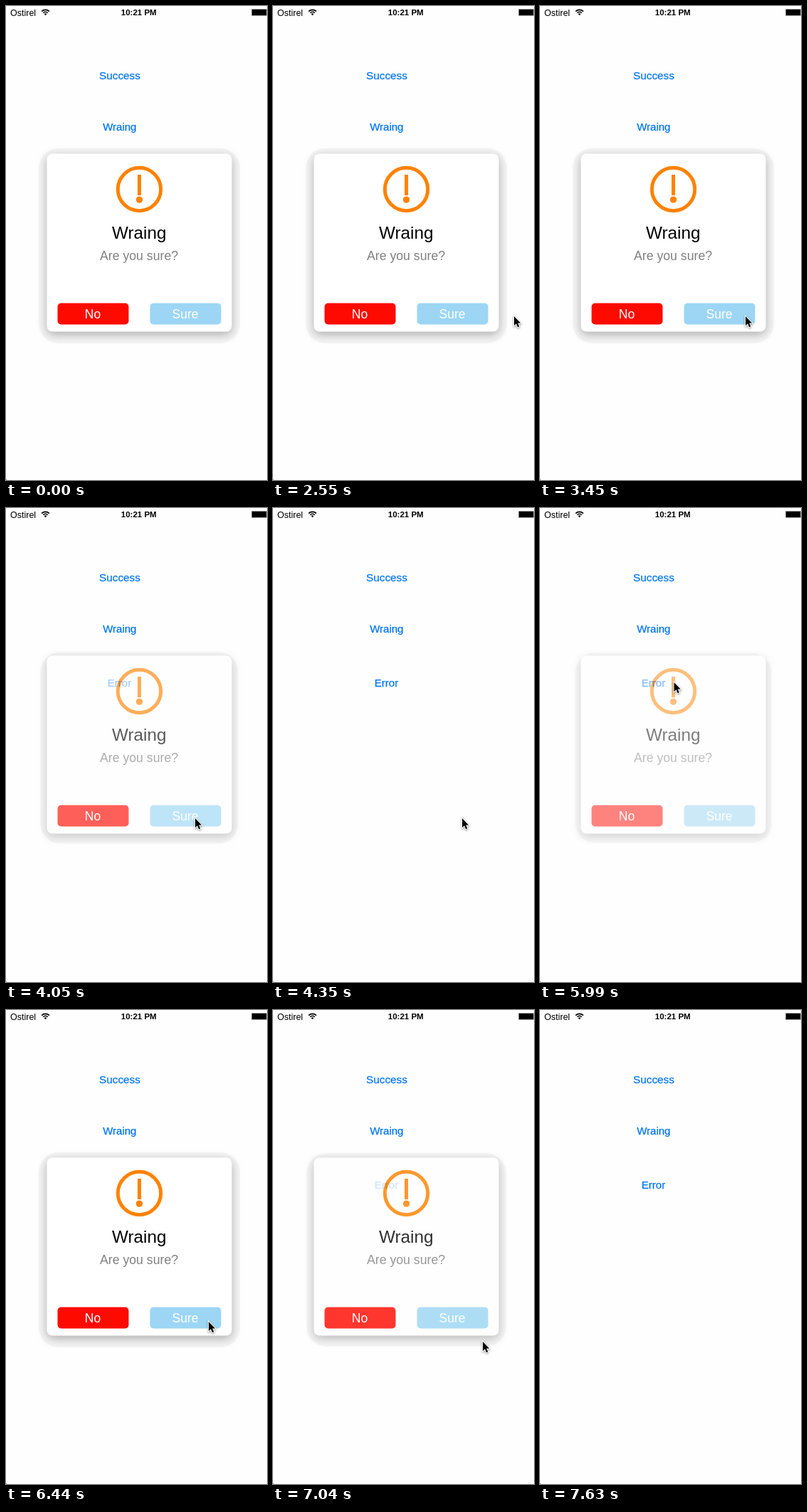
Animation of 367 by 666 pixels, one loop 8670 ms. Source, as an HTML page with a canvas:

```html
<!DOCTYPE html>
<html lang="en">
<head>
<meta charset="utf-8">
<title>Alert demo</title>
<style>
  html, body { margin: 0; width: 100%; height: 100%; overflow: hidden; background: #fefefe; }
  canvas { display: block; }
</style>
</head>
<body>
<canvas id="stage" width="367" height="666"></canvas>
<script>
const W = 367, H = 666, LOOP = 8670, STEP = 150;
const FONT = '"Liberation Sans", Arial, sans-serif';
const BLUE = '#0076f2', ORANGE = '#ff8200', PAPER = '#fefefe';
const ctx = document.getElementById('stage').getContext('2d');

// Pointer stops: [step, x, y]; the pointer is hidden outside this range.
const stops = [
  [17, 338, 434], [19, 322, 434], [21, 302, 434], [23, 288, 434],
  [25, 265, 434], [30, 265, 434], [31, 264, 427], [33, 228, 320],
  [35, 170, 164], [36, 159, 145], [37, 155, 162], [38, 155, 168],
  [39, 155, 168], [41, 220, 318], [42, 267, 412], [43, 284, 436],
  [46, 284, 436], [48, 304, 492], [50, 353, 635]
];

const ease = x => {
  x = Math.min(1, Math.max(0, x));
  return x * x * (3 - 2 * x);
};

function box(c, x, y, w, h, r, color) {
  c.fillStyle = color;
  c.beginPath();
  c.roundRect(x, y, w, h, r);
  c.fill();
}

function label(c, str, x, y, size, color, align = 'center', weight = 'normal') {
  c.font = `${weight} ${size}px ${FONT}`;
  c.textAlign = align;
  c.fillStyle = color;
  c.fillText(str, x, y);
}

// Menu entries carry a hairline outline for a slightly heavier face.
function menuItem(str, x, y, size, alpha = 1) {
  ctx.globalAlpha = alpha;
  label(ctx, str, x, y, size, BLUE);
  ctx.strokeStyle = BLUE;
  ctx.lineWidth = 0.25;
  ctx.strokeText(str, x, y);
  ctx.globalAlpha = 1;
}

const errorItem = () => menuItem('Error', 159.5, 250.5, 15);

function makeCard() {
  const cv = document.createElement('canvas');
  cv.width = W;
  cv.height = H;
  const c = cv.getContext('2d');

  c.save();
  c.shadowColor = 'rgba(0,0,0,0.3)';
  c.shadowBlur = 14;
  c.shadowOffsetY = 4;
  box(c, 57.5, 207.5, 260, 250, 8, '#fff');
  c.restore();

  c.strokeStyle = ORANGE;
  c.lineWidth = 5;
  c.beginPath();
  c.arc(187.5, 257.5, 30.2, 0, Math.PI * 2);
  c.stroke();
  box(c, 185, 237, 5, 29, 0, ORANGE);
  box(c, 182.8, 267.4, 9.4, 9.4, 4.7, ORANGE);

  label(c, 'Wraing', 187.2, 326.5, 24.3, '#000');
  label(c, 'Are you sure?', 187, 356.5, 17.7, '#808080');
  box(c, 72.5, 417.5, 100, 30, 5, '#ff0a00');
  box(c, 202.5, 417.5, 100, 30, 5, '#9cd6f4');
  label(c, 'No', 122, 438.5, 17.5, '#fff');
  label(c, 'Sure', 252, 438.5, 17.5, '#fff');
  return cv;
}
const card = makeCard();

function drawStatus() {
  label(ctx, 'Ostirel', 6, 13.5, 12.5, '#000', 'left');
  label(ctx, '10:21 PM', 186.7, 13, 11.5, '#000', 'center', 'bold');

  ctx.strokeStyle = '#000';
  ctx.lineWidth = 1.6;
  for (const r of [4.6, 7.6]) {
    ctx.beginPath();
    ctx.arc(55.5, 13, r, -Math.PI * 0.75, -Math.PI * 0.25);
    ctx.stroke();
  }
  ctx.fillStyle = '#000';
  ctx.beginPath();
  ctx.moveTo(55.5, 13.2);
  ctx.arc(55.5, 13, 2.6, -Math.PI * 0.75, -Math.PI * 0.25);
  ctx.fill();

  box(ctx, 345, 4, 22, 10, 1, '#999');
  box(ctx, 346, 5, 20, 8, 0, '#000');
}

function drawCard(a) {
  if (a <= 0) return;
  const d = (1 - a) * 7;
  ctx.globalAlpha = Math.min(1, a * 1.5);
  box(ctx, 46 + d, 200 + d, 283 - 2 * d, 274 - 2 * d, 28, '#f5f5f5');
  ctx.globalAlpha = 1;
  // The menu below shows through the card while it fades.
  box(ctx, 57.5, 207.5, 260, 250, 8, PAPER);
  errorItem();
  ctx.globalAlpha = a;
  ctx.drawImage(card, 0, 0);
  ctx.globalAlpha = 1;
}

function pointerAt(step) {
  const next = stops.findIndex(k => k[0] >= step);
  if (next < 0 || step < stops[0][0]) return null;
  const b = stops[next], a = stops[Math.max(0, next - 1)];
  const p = b === a ? 0 : (step - a[0]) / (b[0] - a[0]);
  return [a[1] + (b[1] - a[1]) * p, a[2] + (b[2] - a[2]) * p];
}

function drawPointer(pos) {
  if (!pos) return;
  ctx.save();
  // Stops mark the tip of the white rim; the black arrow sits inside it.
  ctx.translate(pos[0] + 1, pos[1] + 2);
  ctx.beginPath();
  ctx.moveTo(0, 0);
  ctx.lineTo(0, 13);
  ctx.lineTo(3, 10.2);
  ctx.lineTo(5.2, 15.2);
  ctx.lineTo(7.3, 14.3);
  ctx.lineTo(5.2, 9.4);
  ctx.lineTo(9.2, 9.4);
  ctx.closePath();
  ctx.shadowColor = 'rgba(0,0,0,0.45)';
  ctx.shadowBlur = 3;
  ctx.shadowOffsetY = 1;
  ctx.strokeStyle = '#fff';
  ctx.lineWidth = 2;
  ctx.stroke();
  ctx.shadowColor = 'transparent';
  ctx.fillStyle = '#000';
  ctx.fill();
  ctx.restore();
}

function cardAlpha(t) {
  if (t < 5000) return 1 - ease((t - 3890) / 400);
  if (t < 6600) return ease((t - 5800) / 400);
  return 1 - ease((t - 6940) / 400);
}

function render(now) {
  const ms = now % LOOP;
  const slip = ms >= 7600 ? 20 : ms >= 5600 ? 10 : 0;
  const step = Math.floor((ms + slip) / STEP);

  ctx.fillStyle = PAPER;
  ctx.fillRect(0, 0, W, H);
  drawStatus();
  menuItem('Success', 160, 102.5, 15.3);
  menuItem('Wraing', 159.8, 174.5, 15, step === 38 ? 0.25 : 1);
  errorItem();
  drawCard(cardAlpha(step * STEP));
  drawPointer(pointerAt(step));
  box(ctx, 0, 665, 1, 1, 0, '#999');
}

let start;
function tick(now) {
  start ??= now;
  render(now - start);
  requestAnimationFrame(tick);
}
render(0);
requestAnimationFrame(tick);
</script>
</body>
</html>
```
